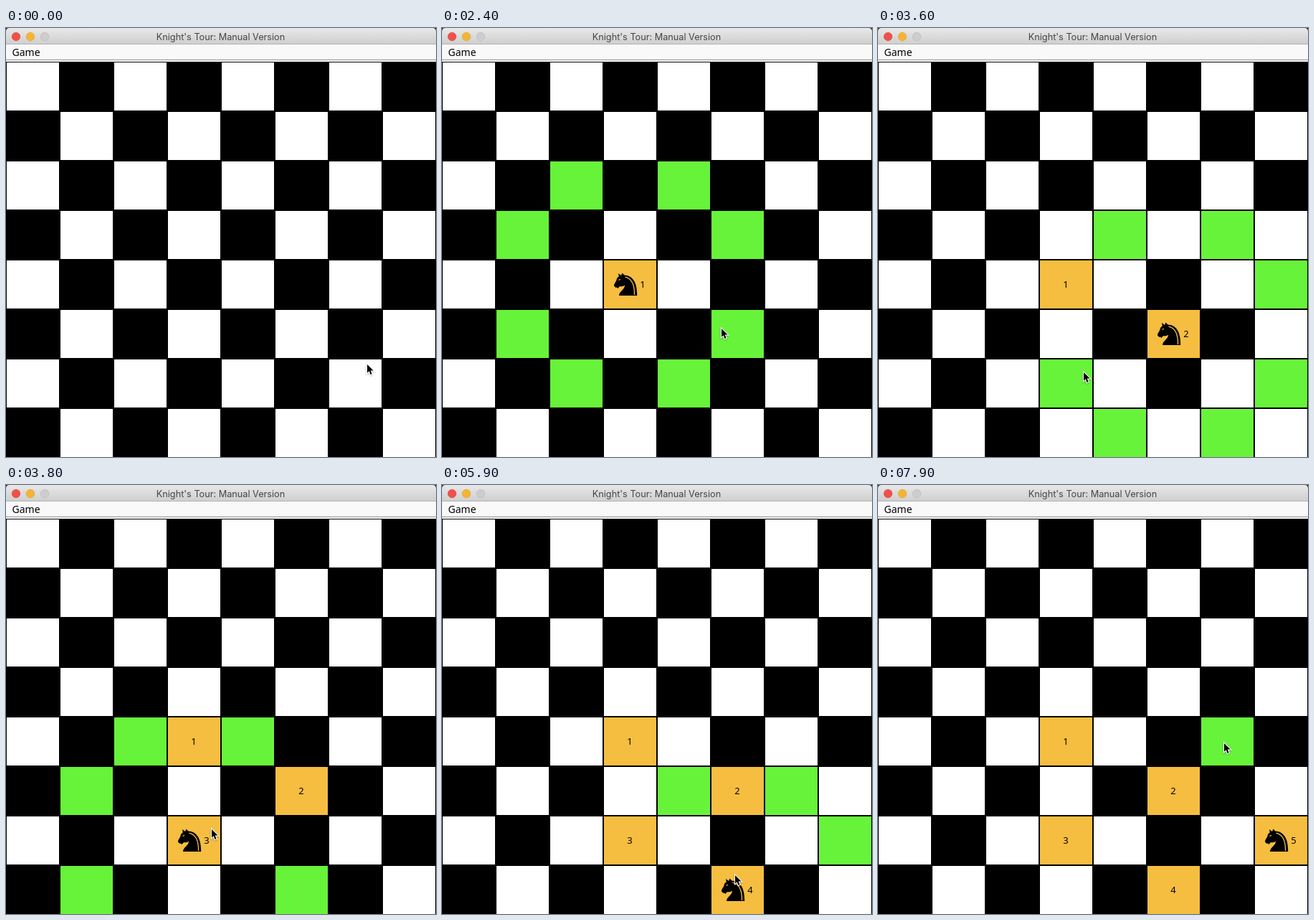
These frames come from a looping animation (600 by 598 pixels, 8 s). An HTML page:

```html
<!DOCTYPE html>
<html lang="en">
<head>
<meta charset="utf-8">
<title>Knight's Tour</title>
<style>
  html, body { margin: 0; width: 100%; height: 100%; overflow: hidden; background: #000; }
  svg { display: block; width: 600px; height: 598px; }
  .title { font: 12.7px Inter, sans-serif; fill: #454545; text-anchor: middle; }
  .menu { font: 500 14px "Noto Sans", sans-serif; fill: #000; }
  .count { font: 13px "Noto Sans", sans-serif; fill: #000; text-anchor: middle; }
</style>
</head>
<body>
<svg viewBox="0 0 600 598">
  <defs>
    <linearGradient id="bar" x2="0" y2="1">
      <stop stop-color="#e8e8e8"/>
      <stop offset="1" stop-color="#cecece"/>
    </linearGradient>
    <filter id="shadow" x="-50%" y="-50%" width="200%" height="200%">
      <feDropShadow dx="0" dy="1" stdDeviation="1" flood-opacity=".35"/>
    </filter>
  </defs>

  <rect width="600" height="23" fill="#2a2a2a"/>
  <path d="M0 23V5Q0 0 5 0H595Q600 0 600 5V23Z" fill="url(#bar)"/>
  <rect y="22" width="600" height="1" fill="#b4b4b4"/>
  <g stroke-width=".6">
    <circle cx="14" cy="12" r="5.8" fill="#f0504a" stroke="#d8433e"/>
    <circle cx="34" cy="12" r="5.8" fill="#f6b433" stroke="#dba02b"/>
    <circle cx="54" cy="12" r="5.8" fill="#cdcdcd" stroke="#b8b8b8"/>
  </g>
  <text class="title" x="299.5" y="17">Knight's Tour: Manual Version</text>
  <rect y="23" width="600" height="24" fill="#f9f9f9"/>
  <rect y="44" width="600" height="1" fill="#8a8a8a"/>
  <rect y="45" width="600" height="2" fill="#fff"/>
  <text class="menu" x="8.5" y="39">Game</text>

  <rect y="47" width="600" height="551"/>
  <g id="board"></g>

  <g id="knight">
    <path d="M21 19L25 22L26.5 18.5L29.5 21.5C40 22 47.5 30 47.2 50H22C22 44 30 42 30 35.5C27.5 38 24.5 37 22.5 37.5L20.5 40L18.8 38.6L17.5 39L15 36.5C15 33 18 31 18.5 28C18.8 25.5 20 24.5 21.8 23.5Z"/>
    <path d="M30.5 24.2C39 26 43.8 34 43.5 49" fill="none" stroke="#f6be40" stroke-width="1.3"/>
    <path d="M21.5 28.5L24 27.2" stroke="#f6be40" stroke-width="1.1"/>
  </g>

  <g id="cursor" filter="url(#shadow)">
    <path d="M1 2V13.7L3.7 11.3L5.6 16L7.6 15.2L5.7 10.6H9.6Z" stroke="#fff" stroke-width="2" paint-order="stroke"/>
  </g>
</svg>

<script>
const LOOP = 8000, TICK = 100;
const CELL_W = 75, CELL_H = 69, TOP = 47;
const GREEN = '#68f33b', ORANGE = '#f6be40';

const moves = [
  { time: 1200, row: 4, col: 3 },
  { time: 2600, row: 5, col: 5 },
  { time: 3700, row: 6, col: 3 },
  { time: 5800, row: 7, col: 5 },
  { time: 7200, row: 6, col: 7 }
];

// Each glide: start time, end time, destination of the pointer tip.
const startPoint = [503, 467];
const glides = [
  [0, 100, 447, 435],
  [200, 1100, 272, 373],
  [1900, 2400, 389, 417],
  [3000, 3600, 286, 478],
  [3900, 4700, 335, 437],
  [4800, 5700, 408, 542],
  [6000, 7000, 551, 482],
  [7500, 7900, 482, 358]
];

const byId = id => document.getElementById(id);
const place = (node, x, y) => node.setAttribute('transform', `translate(${x} ${y})`);

function add(parent, tag, attrs) {
  const node = document.createElementNS('http://www.w3.org/2000/svg', tag);
  for (const name in attrs) node.setAttribute(name, attrs[name]);
  return parent.appendChild(node);
}

const cells = Array.from({ length: 64 }, (_, i) => {
  const row = i >> 3, col = i % 8;
  const x = col * CELL_W, y = TOP + row * CELL_H;
  const rect = add(byId('board'), 'rect', { x: x + 1, y: y + 1, width: CELL_W - 2, height: CELL_H - 2 });
  const label = add(byId('board'), 'text', { class: 'count', y: y + 39 });
  return { row, col, x, y, rect, label };
});

function pointerAt(time) {
  let [x, y] = startPoint;
  for (const [begin, end, toX, toY] of glides) {
    if (time <= begin) break;
    const p = Math.min(1, (time - begin) / (end - begin));
    const eased = p * p * (3 - 2 * p);
    x += (toX - x) * eased;
    y += (toY - y) * eased;
  }
  return [x, y];
}

function drawBoard(time) {
  const made = moves.filter(move => move.time <= time);
  const current = made[made.length - 1];
  byId('knight').style.display = current ? '' : 'none';

  for (const { row, col, x, y, rect, label } of cells) {
    const step = made.findIndex(move => move.row === row && move.col === col) + 1;
    const reachable = current && Math.abs((row - current.row) * (col - current.col)) === 2;
    const base = (row + col) % 2 ? '#000' : '#fff';
    rect.setAttribute('fill', step ? ORANGE : reachable ? GREEN : base);

    const occupied = step > 0 && step === made.length;
    label.textContent = step || '';
    label.setAttribute('x', x + (occupied ? 55 : 37));
    if (occupied) place(byId('knight'), x, y);
  }
}

const start = performance.now();
function frame() {
  const elapsed = (performance.now() - start) % LOOP;
  const time = Math.floor(elapsed / TICK) * TICK;
  drawBoard(time);
  place(byId('cursor'), ...pointerAt(time));
  requestAnimationFrame(frame);
}
frame();
</script>
</body>
</html>
```
